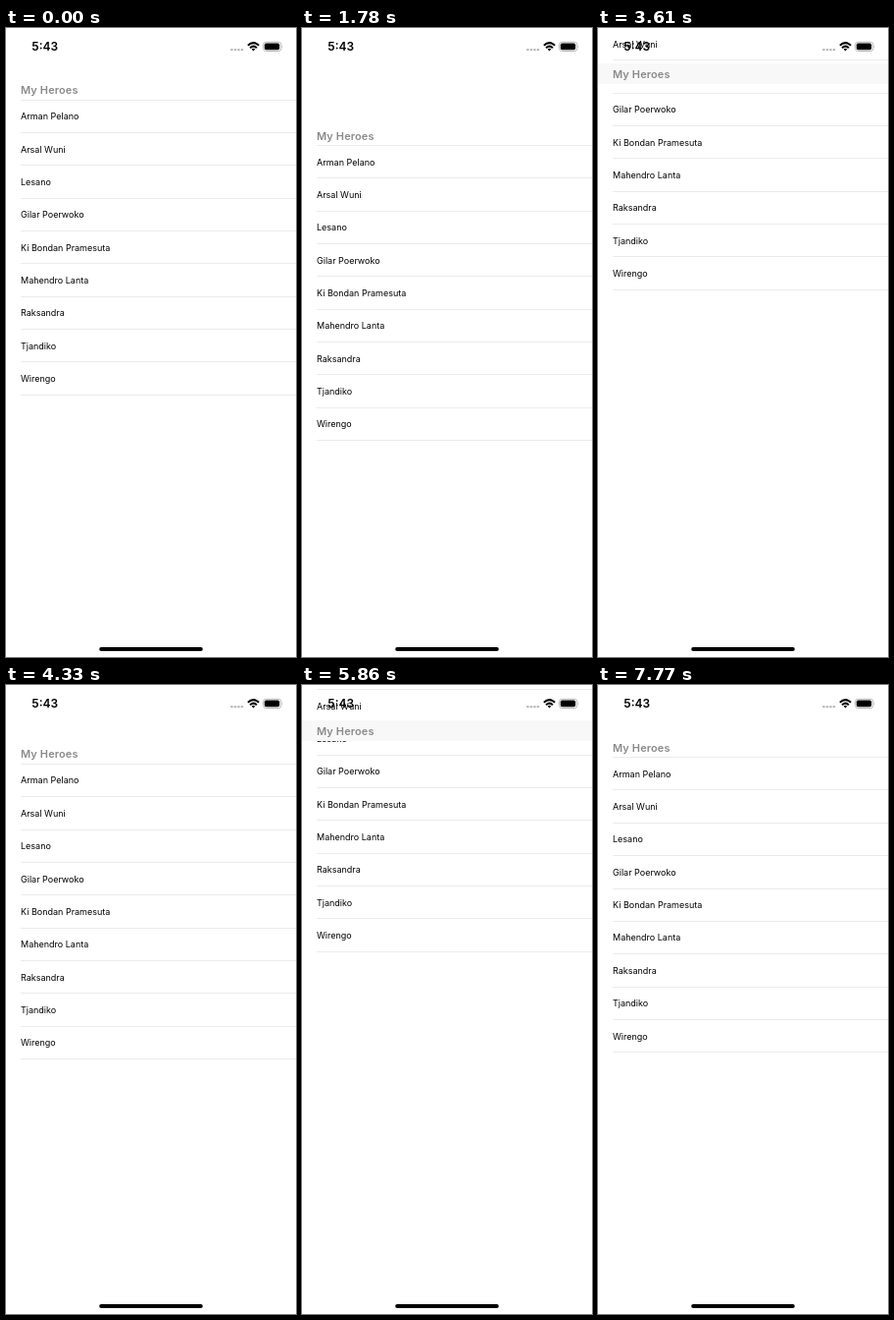
Animation of 296 by 640 pixels, one loop 8000 ms. Source, as an HTML page:

```html
<!DOCTYPE html>
<html lang="en">
<head>
<meta charset="utf-8">
<title>Sticky header list</title>
<style>
  html, body { margin: 0; width: 100%; height: 100%; overflow: hidden; background: #fff; }
  svg { display: block; width: 296px; height: 640px; }
  text { font-family: Inter, "Liberation Sans", sans-serif; }
  .row { font-size: 9px; fill: #000; }
  .title { font-size: 11px; font-weight: 600; letter-spacing: .12px; fill: #8a8a8c; }
  .clock { font-size: 12px; font-weight: 600; }
  .rule { fill: #ebebeb; }
</style>
</head>
<body>
<svg viewBox="0 0 296 640" xmlns="http://www.w3.org/2000/svg">
  <rect width="296" height="640" fill="#fff"/>
  <g id="list"></g>
  <rect id="band" y="36" width="296" height="21" fill="#f8f8f8"/>
  <text id="title" class="title" x="15">My Heroes</text>

  <text class="clock" x="26.3" y="23.2">5:43</text>
  <g id="dots" fill="#b8b8b8"></g>
  <g fill="none" stroke="#000" stroke-width="2">
    <path d="M246.9 17.8Q252.5 12.4 258.1 17.8"/>
    <path d="M249.1 20.2Q252.5 17 255.9 20.2"/>
  </g>
  <path d="M250.7 21.5Q252.5 20 254.3 21.5L252.5 23.4Z"/>
  <rect x="262.5" y="14.3" width="18.4" height="9.2" rx="2.8" fill="none" stroke="#a6a6a6" stroke-width=".8"/>
  <rect x="263.8" y="15.5" width="15.4" height="6.8" rx="1.7"/>
  <path d="M281.8 17.4Q283.1 18.9 281.8 20.4Z" fill="#a6a6a6"/>
  <rect x="95.2" y="630.1" width="105.6" height="3.8" rx="1.9"/>
</svg>
<script>
const LOOP = 8000, REFRESH = 108, LEAD = 36, STIFF = 0.0145;
const ROW = 33.36, TOP = 73.1, PIN = -16.7;
const names = ["Arman Pelano", "Arsal Wuni", "Lesano", "Gilar Poerwoko", "Ki Bondan Pramesuta",
  "Mahendro Lanta", "Raksandra", "Tjandiko", "Wirengo"];

// A touch stops the list, a pull drags it to an offset, a release lets it spring home
const swipes = [
  { touch: 1200, pull: 1230, reach: 1446, release: 1562, offset: 257 },
  { touch: 2550, pull: 2600, reach: 2708, release: 3220, offset: -65.5 },
  { touch: 3220, pull: 3220, reach: 3328, release: 3590, offset: -107 },
  { touch: 4140, pull: 4330, reach: 4546, release: 4828, offset: 138 },
  { touch: 5155, pull: 5480, reach: 5588, release: 6020, offset: -102 },
  { touch: 6490, pull: 6730, reach: 6946, release: 7228, offset: 138 }
];

const $ = id => document.getElementById(id);
function add(parent, tag, attrs) {
  const el = document.createElementNS("http://www.w3.org/2000/svg", tag);
  for (const k in attrs) el.setAttribute(k, attrs[k]);
  return parent.appendChild(el);
}

const rules = Array.from({ length: names.length + 1 }, () =>
  add($("list"), "rect", { class: "rule", x: 15, width: 281, height: 1 }));
const rows = names.map(name => {
  const el = add($("list"), "text", { class: "row", x: 15 });
  el.textContent = name;
  return el;
});
for (let i = 0; i < 4; i++)
  add($("dots"), "rect", { x: 229.2 + i * 3.5, y: 20.9, width: 2.5, height: 2.3, rx: 0.8 });

const snap = dt => REFRESH * Math.floor(dt / REFRESH + 1e-6);
const smooth = x => x * x * (3 - 2 * x);

// Critically damped return to rest
function spring(offset, dt) {
  const x = STIFF * snap(dt);
  return offset * (1 + x) * Math.exp(-x);
}

function offsetAt(t) {
  let y = 0;
  swipes.forEach((s, i) => {
    if (t < s.pull) return;
    const next = swipes[i + 1];
    const stop = next ? Math.min(t, next.touch) : t;
    if (stop > s.release) {
      y = spring(s.offset, stop - s.release);
    } else {
      const part = (snap(t - s.pull) + LEAD) / (s.reach - s.pull + LEAD);
      y += (s.offset - y) * smooth(Math.min(1, part));
    }
  });
  return y;
}

function draw(t) {
  const y = offsetAt(t);
  rules.forEach((el, i) => el.setAttribute("y", Math.floor(TOP + i * ROW + y)));
  rows.forEach((el, i) => el.setAttribute("y", TOP + (i + 0.5) * ROW + 3.4 + y));
  $("title").setAttribute("y", 67.2 + Math.max(y, PIN));
  $("band").setAttribute("visibility", y < PIN ? "visible" : "hidden");
}

const start = performance.now();
function tick() {
  draw((performance.now() - start) % LOOP);
  requestAnimationFrame(tick);
}
tick();
</script>
</body>
</html>
```
